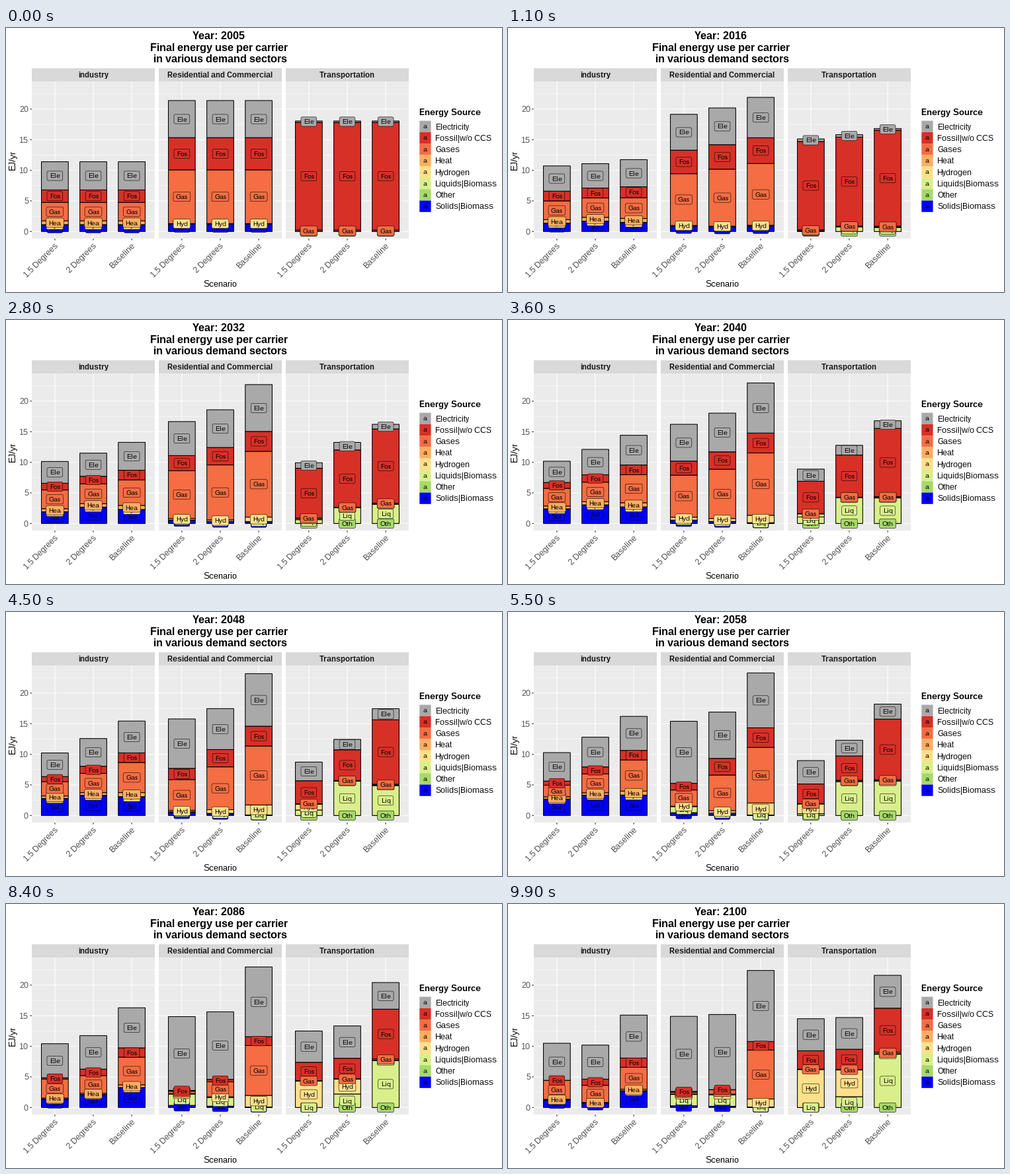
A matplotlib script for the animation above (10000 ms loop, 750x400 px).

```python
import numpy as np
import matplotlib.pyplot as plt
from matplotlib.animation import FuncAnimation
from matplotlib.patches import FancyBboxPatch, Rectangle

plt.rcParams.update({"font.family": "Liberation Sans",
                     "text.hinting": "default",
                     "text.hinting_factor": 1})

W, H, DPI = 750, 400, 100
FRAMES, INTERVAL = 100, 100
FIRST, LAST = 2005, 2100

ZERO, UNIT = 308.3, 9.27            # y of the zero line, pixels per EJ
TOP, BOTTOM, STRIP = 81, 319, 61
PANEL_X, PANEL_W = (39, 231, 423), 186
STEP = PANEL_W / 3.2
BAR_W = 0.7 * STEP
THIN, LINE = 0.55, 1.07

CARRIERS = {                        # code: (legend name, colour)
    "Ele": ("Electricity", "#A9A9A9"),
    "Fos": ("Fossil|w/o CCS", "#D73027"),
    "Gas": ("Gases", "#F46D43"),
    "Hea": ("Heat", "#FDAE61"),
    "Hyd": ("Hydrogen", "#FEE08B"),
    "Liq": ("Liquids|Biomass", "#D9EF8B"),
    "Oth": ("Other", "#A6D96A"),
    "Sol": ("Solids|Biomass", "#0000FF"),
}
SCENARIOS = ("1.5 Degrees", "2 Degrees", "Baseline")

# Energy use over time: 0 is the first year, 1 the last.
# Scenarios part from a common start and follow their own curves from SPLIT.
T = np.linspace(0, 1, FRAMES)
SPLIT, MIDDLE = T[21], T[55]


def line(a, b):
    """Straight from a at SPLIT to b at the end."""
    return a + (b - a) * (T - SPLIT) / (1 - SPLIT)


def arc(a, b, c):
    """Parabola through SPLIT, MIDDLE and the end."""
    return np.polyval(np.polyfit([SPLIT, MIDDLE, 1], [a, b, c], 2), T)


def step(a, b, mid, width):
    """S-curve from a to b."""
    return a + (b - a) / (1 + np.exp((mid - T) / width))


def hump(height, mid, width):
    return height * np.exp(-((T - mid) / width) ** 2 / 2)


switch = step(4, 0, 0.21, 0.04)     # fossil fuels giving way to biomass

INDUSTRY = (
    dict(Sol=1.1, Hyd=0.02, Hea=0.62, Gas=3.02, Fos=2.03, total=11.4),
    dict(Sol=1.2 + hump(1.6, 0.49, 0.16), Hyd=0.03, Hea=line(0.53, 0.1),
         Gas=3.1 - hump(1.2, 0.55, 0.1), Fos=line(1.2, 0),
         total=line(10.1, 10.5)),
    dict(Sol=arc(2.2, 3.3, 0.7), Hyd=0.03, Hea=line(0.6, 0.1),
         Gas=line(3.3, 2.8), Fos=line(1.25, 1),
         total=arc(10.8, 12.8, 10.2)),
    dict(Sol=arc(1.8, 3.3, 2.7), Hyd=0.04, Hea=arc(0.64, 0.64, 0.24),
         Gas=arc(3.7, 5.1, 3.6), Fos=line(1.6, 1.5),
         total=arc(12.05, 16.2, 15.1)),
)
BUILDINGS = (
    dict(Sol=1.25, Liq=0, Hyd=0.05, Gas=8.77, Fos=5.27, total=21.4),
    dict(Sol=line(0.6, 0.28), Liq=step(0, 1.85, 0.55, 0.04),
         Hyd=0.07 + hump(0.4, 0.36, 0.06), Gas=step(8.5, 0.3, 0.48, 0.083),
         Fos=step(2.6, 0.1, 0.52, 0.08), total=arc(17.1, 15.4, 14.9)),
    dict(Sol=line(0.3, 0.2), Liq=step(0.05, 2, 0.78, 0.08),
         Hyd=0.1 + hump(0.5, 0.44, 0.1), Gas=line(9.8, 0.7),
         Fos=step(2.85, 0, 0.74, 0.06), total=arc(19.1, 16.9, 15.2)),
    dict(Sol=step(0.6, 0.02, 0.27, 0.04), Liq=0.06, Hyd=arc(0.2, 1.95, 1.3),
         Gas=arc(11.3, 9.1, 8), Fos=step(3.25, 1.4, 0.7, 0.04),
         total=arc(22.4, 23.3, 22.4)),
)
TRANSPORT = (
    dict(Oth=0, Liq=0.02, Hyd=0, Gas=0.22, Fos=17.6, total=18.06),
    dict(Oth=0, Liq=hump(1.1, 0.39, 0.1), Hyd=arc(0, 1.6, 6.2), Gas=0.07,
         Fos=step(17.9, 3, 0.235, 0.075),
         total=step(18, 8.5, 0.195, 0.05) + step(0, 7, 0.82, 0.1)),
    dict(Oth=0, Liq=hump(5.8, 0.5, 0.17) + step(0, 1.7, 0.75, 0.05),
         Hyd=step(0, 5.2, 0.86, 0.085), Gas=0.08,
         Fos=step(17, 3.3, 0.26, 0.1), total=arc(13.8, 12.3, 14.7)),
    dict(Oth=0, Liq=line(3.2, 8.7) - switch, Hyd=0.08, Gas=line(0.1, 0.25),
         Fos=line(12, 7.2) + switch, total=arc(15.7, 18.2, 21.6)),
)
SECTORS = (("industry", INDUSTRY),
           ("Residential and Commercial", BUILDINGS),
           ("Transportation", TRANSPORT))


def stack_values(start, curves):
    """Yearly values per carrier, bottom up; electricity fills the total."""
    values = {}
    for code, curve in curves.items():
        curve = np.broadcast_to(curve, T.shape)
        lead = np.interp(T, [0, SPLIT], [start[code], curve[T == SPLIT][0]])
        values[code] = np.maximum(np.where(T < SPLIT, lead, curve), 0)
    total = values.pop("total")
    values["Ele"] = np.maximum(total - sum(values.values()), 0)
    return values


fig = plt.figure(figsize=(W / DPI, H / DPI), dpi=DPI, facecolor="white")
ax = fig.add_axes([0, 0, 1, 1])
ax.set(xlim=(0, W), ylim=(H, 0))
ax.axis("off")


def pt(px):
    return px * 72 / DPI


def y_of(value):
    return ZERO - value * UNIT


def rect(x, y, w, h, color, **kw):
    ax.add_patch(Rectangle((x, y), w, h, fc=color, lw=0, zorder=0, **kw))


def rule(xs, ys, color, width):
    ax.plot(xs, ys, color=color, lw=pt(width), zorder=1,
            solid_capstyle="butt", snap=False)


def text(x, y, s, size, color="black", ha="center", **kw):
    return ax.text(x, y, s, fontsize=pt(size), color=color, ha=ha,
                   va="baseline", **kw)


class Segment:
    """One carrier in a stacked bar, with its label."""

    PAD, HEIGHT = 3.9, 14.2

    def __init__(self, x, code, values):
        self.values = values
        color = CARRIERS[code][1]
        self.bar = ax.add_patch(Rectangle(
            (x - BAR_W / 2, ZERO), BAR_W, 0, fc=color, ec="black",
            lw=pt(LINE), zorder=2, snap=False))
        self.label = text(x, 0, code, 10, zorder=3)
        width = self.label.get_window_extent().width + 2 * self.PAD
        self.label.remove()
        self.box = ax.add_patch(FancyBboxPatch(
            (x - width / 2, 0), width, self.HEIGHT, fc=color, ec="black",
            boxstyle="round,pad=0,rounding_size=2.2",
            lw=pt(THIN), zorder=3, snap=False))
        ax.add_artist(self.label)

    def place(self, frame, base):
        value = self.values[frame]
        mid = y_of(base + value / 2)
        self.bar.set_y(y_of(base))
        self.bar.set_height(-value * UNIT)
        self.box.set_y(mid - self.HEIGHT / 2)
        self.label.set_y(mid + 3.5)
        return base + value


def draw_panel(x0, name):
    x1 = x0 + PANEL_W
    rect(x0, STRIP, PANEL_W, TOP - STRIP, "#D9D9D9")
    rect(x0, TOP, PANEL_W, BOTTOM - TOP, "#EBEBEB")
    text(x0 + PANEL_W / 2, 75, name, 12, "#1A1A1A", weight="bold")
    for value in np.arange(0, 23, 2.5):
        y = y_of(value)
        rule([x0, x1], [y, y], "white", THIN if value % 5 else LINE)
    for i, scenario in enumerate(SCENARIOS):
        x = x0 + (0.6 + i) * STEP
        rule([x, x], [TOP, BOTTOM], "white", LINE)
        rule([x, x], [BOTTOM, BOTTOM + 2.8], "#333333", LINE)
        text(x + 6, 330.8, scenario, 12, "#4D4D4D", "right",
             rotation=45, rotation_mode="anchor")


def draw_legend():
    text(625, 132, "Energy Source", 13, ha="left", weight="bold")
    for i, (name, color) in enumerate(CARRIERS.values()):
        y = 149.2 + 17.28 * i
        rect(625.3, y - 8.64, 17.3, 17.28, color, snap=False)
        text(634, y + 3, "a", 10)
        text(649, y + 4.3, name, 12, ha="left")


title = text(322, 17, "", 16, weight="bold")
text(322, 35, "Final energy use per carrier", 16, weight="bold")
text(324, 52, "in various demand sectors", 16, weight="bold")
text(324.3, 392, "Scenario", 13)
text(14, 200, "EJ/yr", 13, rotation=90, rotation_mode="anchor")
for value in range(0, 25, 5):
    y = y_of(value)
    rule([36.2, 39], [y, y], "#333333", LINE)
    text(34, y + 4.3, str(value), 12, "#4D4D4D", "right")
draw_legend()

stacks = []
for x0, (name, (start, *scenarios)) in zip(PANEL_X, SECTORS):
    draw_panel(x0, name)
    for i, curves in enumerate(scenarios):
        x = x0 + (0.6 + i) * STEP
        values = stack_values(start, curves)
        stacks.append([Segment(x, c, v) for c, v in values.items()])


def update(frame):
    title.set_text(f"Year: {round(FIRST + (LAST - FIRST) * T[frame])}")
    for stack in stacks:
        base = 0
        for segment in stack:
            base = segment.place(frame, base)
    return []


anim = FuncAnimation(fig, update, frames=FRAMES, interval=INTERVAL,
                     init_func=lambda: update(0), repeat=True,
                     repeat_delay=0, blit=False)
plt.show()
```
